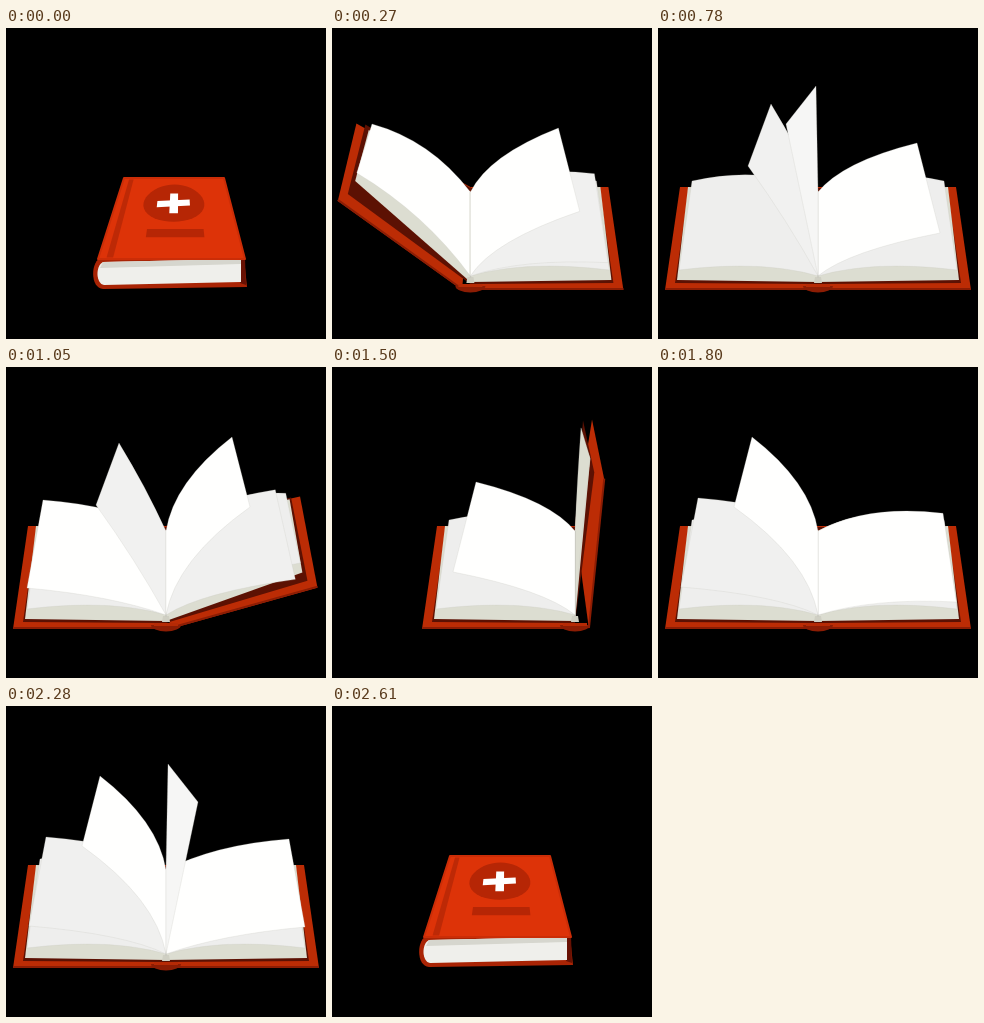
Animation, 320 px wide and 311 px high, one loop 2670 ms. Source, as an HTML page with a canvas:

```html
<!DOCTYPE html>
<html lang="en">
<head>
<meta charset="utf-8">
<title>Book</title>
<style>
  html, body { margin: 0; width: 100%; height: 100%; overflow: hidden; background: #000; }
  canvas { display: block; width: 320px; height: 311px; }
</style>
</head>
<body>
<canvas id="stage" width="320" height="311"></canvas>
<script>
const ctx = document.getElementById('stage').getContext('2d');
const LOOP = 2670, STEP = 30, UNIT = 45;
const FAR_Y = 164, NEAR_Y = 248;

// Turning page: far corner x, y, near corner x, y, curl position, curl height
const POSES = [
  [126, 153, 138, 242, .40, 22],
  [120, 131, 137, 220, .30, 10],
  [99, 115, 122, 205, .25, 6],
  [66, 70, 84, 140, .12, 2],
  [-2, 58, -32, 96, .50, 0],
  [-9, 57, -63, 95, .50, 0],
  [-47, 76, -70, 138, .44, 1],
  [-89, 99, -122, 160, .42, 3],
  [-123, 133, -139, 221, .40, 10],
  [-126, 153, -138, 242, .40, 22]
];
const SHADES = [255, 255, 255, 255, 246, 255, 241, 238, 255, 255];
const TURN_LEFT = [165, 255, 390, 480, 570, 660, 795, 862];
const TURN_RIGHT = [1290, 1545, 1635, 1710, 1890, 1935, 2025];

// Cover angle in degrees: 0 closed, 180 open
const ANGLE = [[0, 0], [45, 0], [60, 35], [150, 95], [360, 180],
  [1020, 180], [1050, 164], [1110, 122], [1290, 20], [1350, 0],
  [1485, 0], [1500, 95], [1530, 112], [1740, 180],
  [2300, 180], [2350, 160], [2580, 20], [2610, 0], [LOOP, 0]];
// Spine position: 0 at the side, 1 in the middle
const SLIDE = [[0, 0], [60, 0], [150, .1], [330, 1], [1050, 1], [1110, .6],
  [1190, 0], [1500, 0], [1740, 1], [2340, 1], [2400, .6], [2480, 0], [LOOP, 0]];

const clamp = (v, lo, hi) => Math.min(hi, Math.max(lo, v));
const mix = (a, b, u) => a + (b - a) * u;
const gray = v => `rgb(${v},${v},${Math.round(v * .996)})`;

function at(track, t) {
  const i = Math.max(1, track.findIndex(k => k[0] >= t));
  const [t0, a] = track[i - 1], [t1, b] = track[i];
  return mix(a, b, (t - t0) / (t1 - t0));
}

function poly(points, fill) {
  ctx.beginPath();
  points.forEach(p => ctx.lineTo(p[0], p[1]));
  ctx.closePath();
  ctx.fillStyle = fill;
  ctx.fill();
}

function bend([x0, y0], [x1, y1], pos, height) {
  return [x0 + (x1 - x0) * pos, mix(y0, y1, .5) - height];
}

function sheet(sx, far, near, pos, height, fill) {
  const top = [sx, FAR_Y], low = [sx, NEAR_Y];
  ctx.beginPath();
  ctx.moveTo(...top);
  ctx.quadraticCurveTo(...bend(top, far, pos, height), ...far);
  ctx.lineTo(...near);
  ctx.quadraticCurveTo(...bend(low, near, pos, height * .6), ...low);
  ctx.closePath();
  ctx.fillStyle = fill;
  ctx.fill();
  ctx.strokeStyle = 'rgba(195,195,188,.4)';
  ctx.lineWidth = .6;
  ctx.stroke();
}

// Corners of a left board lifted by the given angle
function board(sx, lift) {
  const c = Math.cos(lift), s = Math.sin(lift), q = Math.max(0, -c);
  return {
    farSpine: [sx + 30 * q, 159 - 9 * q],
    farOuter: [sx - 138 * c - 5 * s - 8 * q, 159 - 107 * s - 9 * q],
    nearOuter: [sx - 153 * c - 16 * s - 2 * q, 262 - 150 * s - 31 * q],
    nearSpine: [sx + 4 * q - 14 * s, 262 - 31 * q]
  };
}

function half(sx, lift, shade) {
  const c = Math.cos(lift), s = Math.sin(lift), b = board(sx, lift);
  const { farOuter: fo, nearOuter: no } = b;
  poly([b.farSpine, fo, no, b.nearSpine], '#bc2c05');
  ctx.strokeStyle = '#8c1d04';
  ctx.lineWidth = 2;
  ctx.beginPath();
  ctx.moveTo(no[0], no[1] - 1);
  ctx.lineTo(b.nearSpine[0], b.nearSpine[1] - 1);
  ctx.stroke();
  poly([[sx, 160], [fo[0] + 9, fo[1] + 1], [no[0] + 10, no[1] - 7], [sx, 256]], '#5c1103');

  const far = [fo[0] + 12 * c + 10 * s, fo[1] - 6 * c + 9 * s];
  const low = [no[0] + 12 * c + 13 * s, no[1] - 10 * c - 20 * s];
  const near = [low[0] + 2 * c, low[1] - 10 * c];
  const steep = lift > 1;
  poly([[sx, FAR_Y], [far[0] - 4 * c, far[1] + 6], low, [sx, 254]], '#dcddd1');
  sheet(sx, far, near, .4, 22 * Math.max(0, c), steep ? '#dcddd1' : gray(shade));
}

function outside(sx, lift, emblem) {
  const b = board(sx, lift);
  const map = (u, v) => [0, 1].map(i => mix(
    mix(b.farSpine[i], b.farOuter[i], u), mix(b.nearSpine[i], b.nearOuter[i], u), v));
  const rect = (u0, v0, u1, v1, fill) =>
    poly([map(u0, v0), map(u1, v0), map(u1, v1), map(u0, v1)], fill);
  const corners = [map(0, 0), map(1, 0), map(1, 1), map(0, 1)];
  poly(corners, '#dd3308');
  ctx.lineJoin = 'round';
  ctx.lineWidth = 2;
  ctx.strokeStyle = '#cb2d07';
  ctx.stroke();
  rect(.055, .02, .1, .98, '#bd2906');
  if (!emblem) return;
  const ring = Array.from({ length: 40 }, (_, i) => {
    const a = i * Math.PI / 20;
    return map(.506 + .265 * Math.cos(a), .31 + .23 * Math.sin(a));
  });
  poly(ring, '#b62605');
  rect(.304, .63, .74, .73, '#b62605');
  rect(.47, .19, .542, .435, '#fff');
  poly([map(.36, .285), map(.645, .265), map(.645, .34), map(.36, .36)], '#fff');
}

function closedBook(sx, emblem) {
  ctx.save();
  ctx.translate(sx - 88, 0);
  ctx.beginPath();
  ctx.moveTo(96, 229);
  ctx.bezierCurveTo(84, 233, 84, 260, 97, 261);
  ctx.lineTo(241, 259);
  ctx.lineTo(238, 230);
  ctx.fillStyle = '#a92405';
  ctx.fill();
  poly([[234, 231], [239, 230], [240, 257], [234, 255]], '#681103');
  ctx.beginPath();
  ctx.moveTo(97, 234);
  ctx.bezierCurveTo(89, 238, 90, 256, 98, 257);
  ctx.lineTo(235, 254);
  ctx.lineTo(235, 231);
  ctx.fillStyle = '#efefeb';
  ctx.fill();
  poly([[97, 234], [235, 231], [235, 236], [94, 240]], '#d6d6ce');
  ctx.restore();
  outside(sx, Math.PI, emblem);
}

function turningPages(clock) {
  const active = (starts, dir) => starts
    .map(s => ({ k: (clock - s) / UNIT, dir }))
    .filter(p => p.k > 0 && p.k < 9);
  return [...active(TURN_LEFT, 1), ...active(TURN_RIGHT, -1)];
}

function drawPage(sx, page, covered) {
  const i = Math.min(8, Math.floor(page.k)), u = page.k - i;
  const [fx, fy, nx, ny, pos, height] = POSES[i].map((v, j) => mix(v, POSES[i + 1][j], u));
  const shade = covered ? 240 : Math.round(mix(SHADES[i], SHADES[i + 1], u));
  sheet(sx, [sx + page.dir * fx, fy], [sx + page.dir * nx, ny], pos, height, gray(shade));
}

function draw(t) {
  ctx.setTransform(1, 0, 0, 1, 0, 0);
  ctx.fillStyle = '#000';
  ctx.fillRect(0, 0, 320, 311);

  const backCover = t >= 800 && t < 2000;
  if (backCover) ctx.setTransform(-1, 0, 0, 1, 320, 0);
  const angle = at(ANGLE, t), lift = Math.PI * (1 - angle / 180);
  const sx = mix(backCover ? 77 : 88, 160, at(SLIDE, t));
  if (angle < .5) return closedBook(sx, !backCover);

  const clock = t - clamp(t - 480, 0, 120) - clamp(t - 2010, 0, 90);
  const limit = angle / 20;
  const pages = turningPages(clock).map(({ k, dir }) => {
    const side = backCover ? -dir : dir;
    return { dir: side, k: side > 0 ? Math.min(k, limit) : Math.max(k, 9 - limit) };
  });
  const onLeft = p => (p.k > 3.5) === (p.dir > 0);
  const restShade = left => pages.some(p => onLeft(p) === left) ? 238 : 255;
  const inside = angle >= 82;

  ctx.save();
  ctx.translate(2 * sx, 0);
  ctx.scale(-1, 1);
  half(sx, 0, restShade(false));
  ctx.restore();
  if (inside) half(sx, lift, restShade(true));

  ctx.fillStyle = '#8c1d04';
  ctx.beginPath();
  ctx.ellipse(sx, 258, 15, 6.5, 0, 0, Math.PI);
  ctx.fill();
  ctx.fillStyle = '#b62a05';
  ctx.fillRect(sx - 12, 256, 24, 3);
  poly([[sx - 3, 249], [sx + 3, 249], [sx + 4, 255], [sx - 4, 255]], '#cfcfc3');
  ctx.fillStyle = '#c9c9c0';
  ctx.fillRect(sx - .7, FAR_Y, 1.4, 86);

  const lead = Math.max(0, ...pages.filter(p => p.k < 3.5).map(p => p.k));
  pages.sort((a, b) => Math.abs(b.k - 4.4) - Math.abs(a.k - 4.4));
  pages.forEach(p => drawPage(sx, p, p.k < lead));

  if (!inside) outside(sx, lift, !backCover);
}

const start = performance.now();
function tick() {
  const t = (performance.now() - start) % LOOP;
  draw(Math.floor(t / STEP) * STEP);
  requestAnimationFrame(tick);
}
tick();
</script>
</body>
</html>
```
